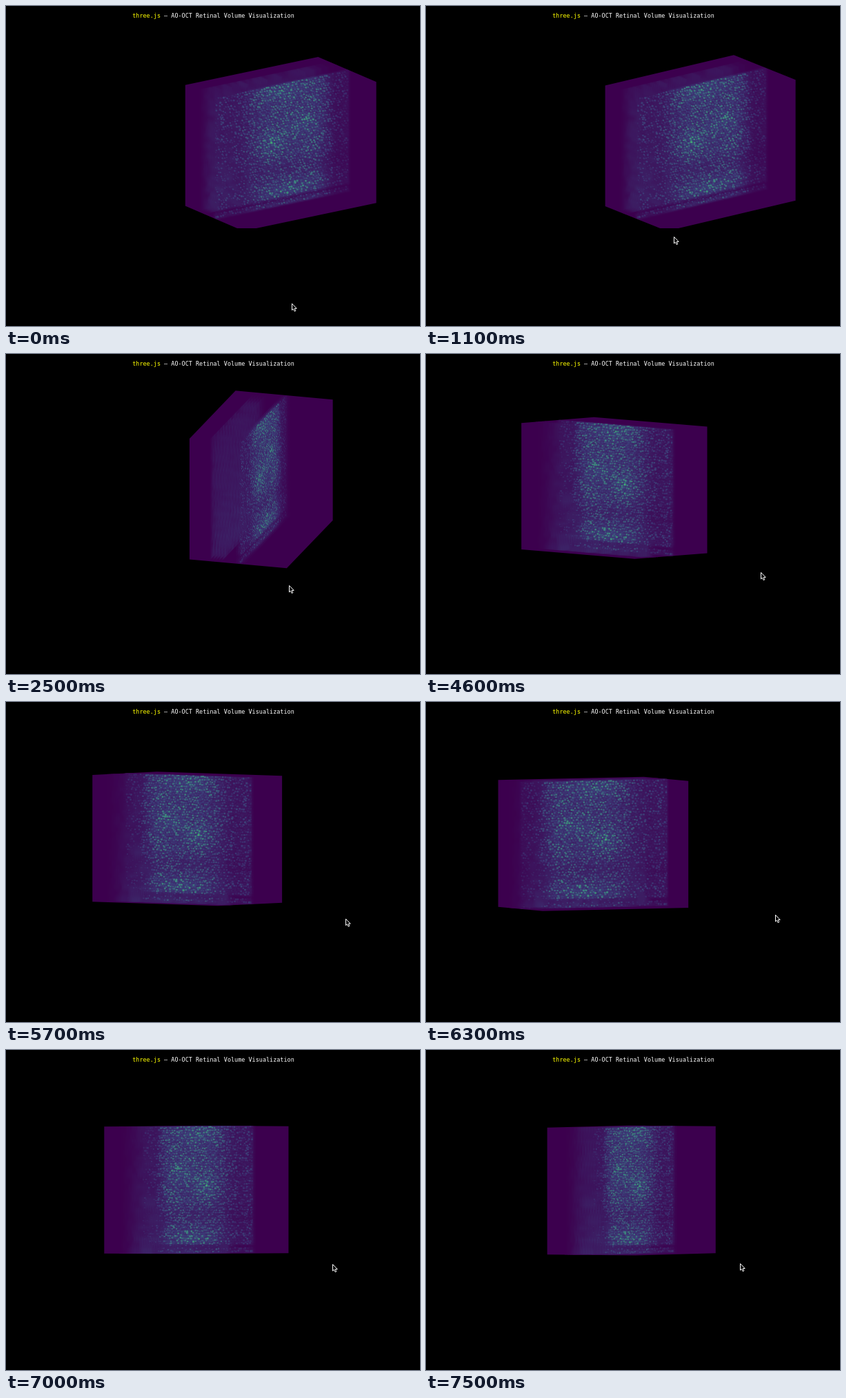
An HTML page with a canvas for the animation above (8000 ms loop, 600 by 465 pixels).

```html
<!DOCTYPE html>
<html lang="en">
<head>
<meta charset="utf-8">
<title>Retinal volume</title>
<style>
  html, body { margin: 0; width: 100%; height: 100%; overflow: hidden; background: #000; }
  canvas { position: absolute; left: 0; top: 0; }
  #title {
    position: absolute; left: 0.5px; top: 8px; width: 600px; line-height: 12px;
    text-align: center; white-space: pre; color: #fff;
    font-family: "DejaVu Sans Mono", monospace; font-size: 8.47px;
  }
  #title span { color: #ff0; }
</style>
</head>
<body>
<canvas id="stage" width="600" height="465"></canvas>
<div id="title"><span>three.js</span> – AO-OCT Retinal Volume Visualization</div>
<script>
const ctx = document.getElementById('stage').getContext('2d');
const LOOP = 8000, STEP = 100;
const BOX = { w: 235, d: 147, h: 184.5 };
// Offset of the box centre from the orbit target, along its own axes
const OFFSET = { w: 87, d: 47, h: -30 };
const TARGET = { x: 300, y: 232.5 };
const NEAR_CLIP_Y = 323;

// Pose: azimuth, elevation (degrees), pointer x, pointer y
const START = [35, 17.6, 414, 432];
const MOVES = [
  { from: 200, to: 600, pose: [35, 17.6, 354, 335] },
  { from: 1000, to: 1100, pose: [37.5, 18, 359, 335] },
  { from: 1800, to: 2000, pose: [63, 17.6, 392, 335] },
  { from: 2500, to: 2500, pose: [73.5, 18, 410, 336] },
  { from: 4600, to: 4600, pose: [134.3, 4.7, 485, 317] },
  { from: 4700, to: 4700, pose: [134.6, 4.5, 485, 317] },
  { from: 5700, to: 5900, pose: [152.5, -2, 506, 310] },
  { from: 6300, to: 6300, pose: [154, -2.6, 506, 309] },
  { from: 6400, to: 6600, pose: [151, -2, 494, 310] },
  { from: 6800, to: 6800, pose: [140, -1, 483, 311] },
  { from: 7000, to: 7000, pose: [132.5, -0.4, 473, 311] },
  { from: 7400, to: 7500, pose: [119.7, -0.9, 455, 310] },
];

let seed = 11;
const random = () => {
  seed = (seed * 1664525 + 1013904223) % 4294967296;
  return seed / 4294967296;
};
const clamp = (v) => Math.min(1, Math.max(0, v));
const smooth = (a, b, v) => {
  const t = clamp((v - a) / (b - a));
  return t * t * (3 - 2 * t);
};
const bump = (v, mid, width) => Math.exp(-(((v - mid) / width) ** 2));

const STOPS = [[60, 0, 78], [58, 62, 122], [44, 106, 130], [33, 148, 130], [55, 190, 112], [205, 210, 50]];
function colour(value) {
  const p = clamp(value) * (STOPS.length - 1);
  const i = Math.min(STOPS.length - 2, Math.floor(p));
  return `rgb(${STOPS[i].map((c, k) => Math.round(c + (STOPS[i + 1][k] - c) * (p - i)))})`;
}

function makeTexture(width, height, paint) {
  const canvas = document.createElement('canvas');
  canvas.width = width;
  canvas.height = height;
  paint(canvas.getContext('2d'), width, height);
  return canvas;
}

// Brightness of the cell layer at u (across) and v (down)
function density(u, v) {
  const across = 0.42 + 0.53 * smooth(0.12, 0.42, u) - 0.66 * smooth(0.74, 0.92, u);
  const down = 0.9 - 0.25 * bump(v, 0.7, 0.09) - 0.25 * smooth(0.94, 0.96, v);
  const clusters = 0.25 * (bump(u, 0.64, 0.1) * bump(v, 0.36, 0.07) + bump(u, 0.5, 0.15) * bump(v, 0.06, 0.08)
    + bump(u, 0.55, 0.15) * bump(v, 0.87, 0.05) + bump(u, 0.42, 0.1) * bump(v, 0.46, 0.08));
  const band = 1 - 0.75 * bump(v, 0.945, 0.016);
  return (across * down + clusters) * band;
}

// Soft glow between the cells
const glow = makeTexture(470, 369, (g, w, h) => {
  for (let y = 0; y < h; y += 3) {
    for (let x = 0; x < w; x += 3) {
      g.fillStyle = colour(density(x / w, y / h) * (0.09 + 0.1 * random()));
      g.fillRect(x, y, 3, 3);
    }
  }
});

const cells = makeTexture(glow.width, glow.height, (g, w, h) => {
  g.drawImage(glow, 0, 0);
  const dot = (x, y, value, size) => {
    g.fillStyle = colour(value);
    for (const [scale, alpha] of [[1.5, 0.35], [1, 0.8]]) {
      g.globalAlpha = alpha;
      g.beginPath();
      g.arc(x, y, size * scale, 0, 7);
      g.fill();
    }
  };
  for (let row = 0, y = 3; y < h; y += 7.5, row++) {
    for (let x = (row % 2) * 4.5; x < w; x += 9) {
      const px = x + (random() - 0.5) * 5, py = y + (random() - 0.5) * 5;
      const value = density(px / w, py / h) * (0.2 + 0.46 * random() ** 1.7);
      dot(px, py, value, 1.8 + 0.8 * random());
    }
  }
  dot(0.42 * w, 0.468 * h, 0.82, 2.4);
});

const haze = makeTexture(60, 22, (g, w, h) => {
  for (let y = 0; y < h; y++) {
    for (let x = 0; x < w; x++) {
      const fade = smooth(0, 0.1, x / w) * (1 - smooth(0.75, 1, x / w));
      g.fillStyle = colour(fade * (0.03 + 0.05 * random() + 0.06 * random() * y / h));
      g.fillRect(x, y, 1, 1);
    }
  }
});

// Depth position, texture and opacity of each slice
const SLICES = [
  ...[0.2, 0.23, 0.26, 0.29, 0.32].map((d) => [d, haze, 0.8]),
  [0.48, glow, 0.3], [0.5, glow, 0.7],
  [0.516, cells, 1], [0.526, cells, 0.9],
  [0.54, glow, 0.5], [0.56, glow, 0.2],
];

function poseAt(time) {
  const tick = Math.floor(time / STEP) * STEP;
  let pose = START;
  for (const { from, to, pose: goal } of MOVES) {
    const p = clamp((tick - from + STEP) / (to - from + STEP));
    pose = pose.map((v, i) => v + (goal[i] - v) * p);
  }
  return pose;
}

function drawVolume(azimuth, elevation) {
  const a = azimuth * Math.PI / 180, e = elevation * Math.PI / 180;
  const c = Math.cos(a), s = Math.sin(a), tilt = Math.sin(e), rise = Math.cos(e);
  const height = BOX.h * rise;
  const project = (w, d, h) => [
    TARGET.x + w * c + d * s,
    TARGET.y + h * rise + tilt * (d * c - w * s),
  ];
  // Point on the top face, u and d in 0..1
  const top = (u, d) => project(OFFSET.w + (u - 0.5) * BOX.w, OFFSET.d + (d - 0.5) * BOX.d, OFFSET.h - BOX.h / 2);

  ctx.save();
  ctx.beginPath();
  ctx.rect(0, 0, 600, NEAR_CLIP_Y);
  ctx.clip();

  const corners = [top(0, 0), top(0, 1), top(1, 0), top(1, 1)].sort((p, q) => p[0] - q[0]);
  const [left, right] = [corners[0], corners[3]];
  const [back, front] = corners.slice(1, 3).sort((p, q) => p[1] - q[1]);
  ctx.beginPath();
  for (const [x, y] of [left, back, right]) ctx.lineTo(x, y);
  for (const [x, y] of [right, front, left]) ctx.lineTo(x, y + height);
  ctx.fillStyle = colour(0);
  ctx.fill();

  // Brightest value along the line of sight wins
  ctx.globalCompositeOperation = 'lighten';
  for (const [d, texture, alpha] of SLICES) {
    const [x0, y0] = top(0, d), [x1, y1] = top(1, d);
    ctx.globalAlpha = alpha;
    ctx.setTransform((x1 - x0) / texture.width, (y1 - y0) / texture.width, 0, height / texture.height, x0, y0);
    ctx.drawImage(texture, 0, 0);
  }
  ctx.restore();
}

const arrow = new Path2D('M.5 .5V10L2.6 8.1L4.1 11.6L5.8 10.9L4.3 7.5H7.2Z');
function drawPointer(x, y) {
  ctx.save();
  ctx.translate(x, y);
  ctx.fillStyle = '#000';
  ctx.strokeStyle = '#fff';
  ctx.lineWidth = 1;
  ctx.fill(arrow);
  ctx.stroke(arrow);
  ctx.restore();
}

function frame() {
  const [azimuth, elevation, x, y] = poseAt(performance.now() % LOOP);
  ctx.clearRect(0, 0, 600, 465);
  drawVolume(azimuth, elevation);
  drawPointer(x, y);
  requestAnimationFrame(frame);
}
frame();
</script>
</body>
</html>
```
